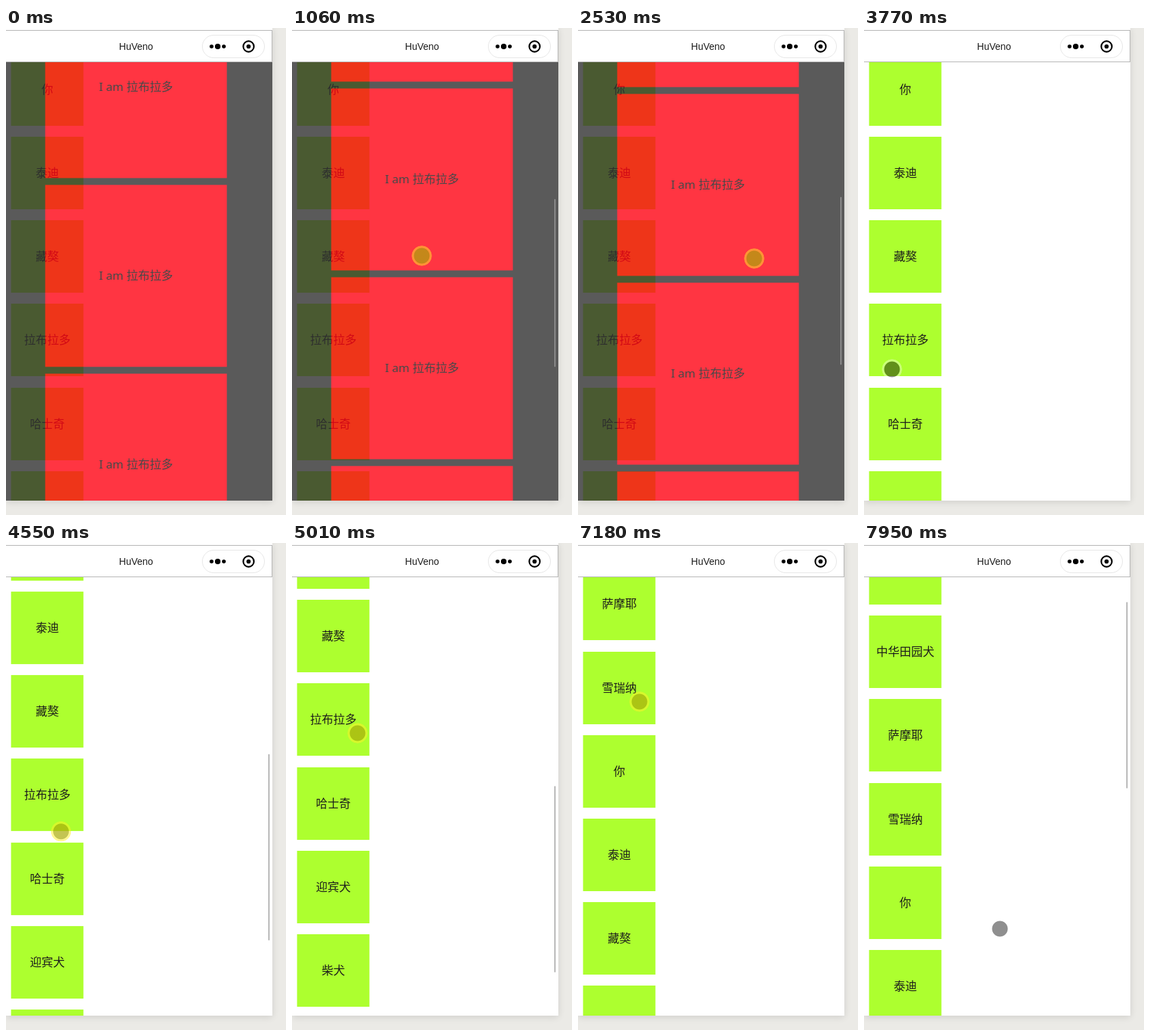
Write an HTML page that moves like this. It is 410x712 px and loops after 8000 ms.

```html
<!DOCTYPE html>
<html lang="zh-CN">
<head>
<meta charset="utf-8">
<title>Scroll and modal demo</title>
<style>
  html, body { margin: 0; width: 100%; height: 100%; overflow: hidden; background: #ebeae6; }
  body { position: relative; font: 17px "Noto Sans", "Noto Sans CJK SC", "Noto Sans CJK", sans-serif; color: #1c1c1c; }
  div, svg { position: absolute; box-sizing: border-box; }
  #phone { left: 0; top: 0; width: 390px; height: 691px; background: #fff; box-shadow: 0 2px 10px rgba(0,0,0,.12); }
  #bar { left: 0; top: 3px; width: 390px; height: 47px; border: solid #b4b4b4; border-width: 1px 1px 1px 0; }
  #title { left: 0; top: 17px; width: 381px; text-align: center; font: 14px/20px "Liberation Sans", Arial, sans-serif; }
  #view, #modal { left: 0; width: 390px; height: 641px; overflow: hidden; }
  #view { top: 50px; }
  #modal { top: 0; background: #323232; opacity: .8; }
  .card { text-align: center; white-space: nowrap; }
  #list .card { left: 7px; width: 106px; height: 106px; line-height: 106px; background: #adff2f; }
  #stack .card { left: 57px; width: 266px; height: 266px; line-height: 266px; background: rgb(255,3,20); }
  #thumb { left: 384px; width: 2px; }
  #cursor { width: 30px; height: 30px; border-radius: 50%; left: -15px; top: -15px; }
</style>
</head>
<body>
<div id="phone">
  <div id="view">
    <div id="list"></div>
    <div id="modal"><div id="stack"></div></div>
    <div id="thumb"></div>
  </div>
  <div id="bar"></div>
  <div id="title">HuVeno</div>
  <svg width="390" height="50">
    <rect x="287.5" y="10.5" width="91" height="33" rx="16.5" fill="#fff" stroke="#e6e6e6"/>
    <circle cx="301" cy="27" r="2.8"/><circle cx="310" cy="27" r="4.1"/><circle cx="319" cy="27" r="2.8"/>
    <circle cx="355.2" cy="27" r="7.8" fill="none" stroke="#000" stroke-width="2.2"/>
    <circle cx="355.2" cy="27" r="3.1"/>
  </svg>
</div>
<div id="cursor"></div>
<script>
const $ = id => document.getElementById(id);
const LOOP = 8000, VIEW = 641, CLOSE = 3770;
const NAMES = ['', '中华田园犬', '萨摩耶', '雪瑞纳', '你', '泰迪', '藏獒', '拉布拉多', '哈士奇', '迎宾犬', '柴犬', ''];

function fill(box, labels, first, pitch) {
  labels.forEach((label, i) => {
    const card = document.createElement('div');
    card.className = 'card';
    card.textContent = label;
    card.style.top = first + i * pitch + 'px';
    box.append(card);
  });
}
fill($('list'), NAMES, 20, 122.2);
fill($('stack'), Array(6).fill('I am 拉布拉多'), 10, 276);

// The pointer rests between gestures; a drag also names the scroll offset it ends on.
const start = { x: 302, y: 614, modal: 383, page: 522 };
const gestures = [
  { from: 130, to: 600, x: 193, y: 525 },
  { from: 920, to: 1060, x: 190, y: 333, modal: 524 },
  { from: 1130, to: 1400, x: 205, y: 225, modal: 632 },
  { from: 1400, to: 2530, x: 258, y: 337, modal: 516 },
  { from: 2840, to: 3370, x: 41, y: 499 },
  { from: 3850, to: 4070, x: 74, y: 529 },
  { from: 4390, to: 4780, x: 92, y: 235, page: 763 },
  { from: 4780, to: 5010, x: 96, y: 278, page: 720 },
  { from: 5080, to: 5400, x: 118, y: 606, page: 278 },
  { from: 5700, to: 6110, x: 25, y: 509 },
  { from: 6500, to: 6750, x: 217, y: 300 },
  { from: 6750, to: 6950, x: 90, y: 232 },
  { from: 7260, to: 7640, x: 89, y: 475, page: 86 },
  { from: 7800, to: 7950, x: 199, y: 564 }
];
const presses = [[830, 2760], [3540, CLOSE], [4230, 5310], [7180, 7870]];
const thumbs = [[980, 2910], [4460, 5780], [7330, LOOP]];
const within = (spans, t) => spans.some(([a, b]) => t >= a && t < b);

function stateAt(t) {
  const s = { ...start };
  for (const { from, to, ...goal } of gestures) {
    const p = Math.min(1, Math.max(0, (t - from) / (to - from)));
    const ease = (1 - Math.cos(Math.PI * p)) / 2;
    for (const k in goal) s[k] += (goal[k] - s[k]) * ease;
  }
  return s;
}

const disc = (core, ring) =>
  `radial-gradient(circle, ${core} 11px, ${ring} 11.9px, ${ring} 14.3px, transparent 15px)`;
const IDLE = disc('rgba(0,0,0,.44)', 'rgba(255,255,255,.35)');
const DOWN = disc('rgba(171,171,9,.7)', 'rgba(255,240,40,.5)');

const shift = (el, x, y) => el.style.transform = `translate(${x}px, ${y}px)`;

function draw(t) {
  const { x, y, modal, page } = stateAt(t), open = t < CLOSE;
  shift($('list'), .4, -page);
  shift($('stack'), .4, .4 - modal);
  $('modal').style.display = open ? '' : 'none';

  const size = open ? 245 : 272, thumb = $('thumb').style;
  thumb.display = within(thumbs, t) ? '' : 'none';
  thumb.height = size + 'px';
  thumb.background = open ? '#8a8a8a' : '#b8b8b8';
  shift($('thumb'), 0, (open ? modal : page) * size / VIEW);

  const cursor = $('cursor');
  cursor.style.display = t < gestures[0].from ? 'none' : '';
  cursor.style.background = within(presses, t) ? DOWN : IDLE;
  shift(cursor, x, y);
}

function frame() {
  draw(performance.now() % LOOP);
  requestAnimationFrame(frame);
}
frame();
</script>
</body>
</html>
```
